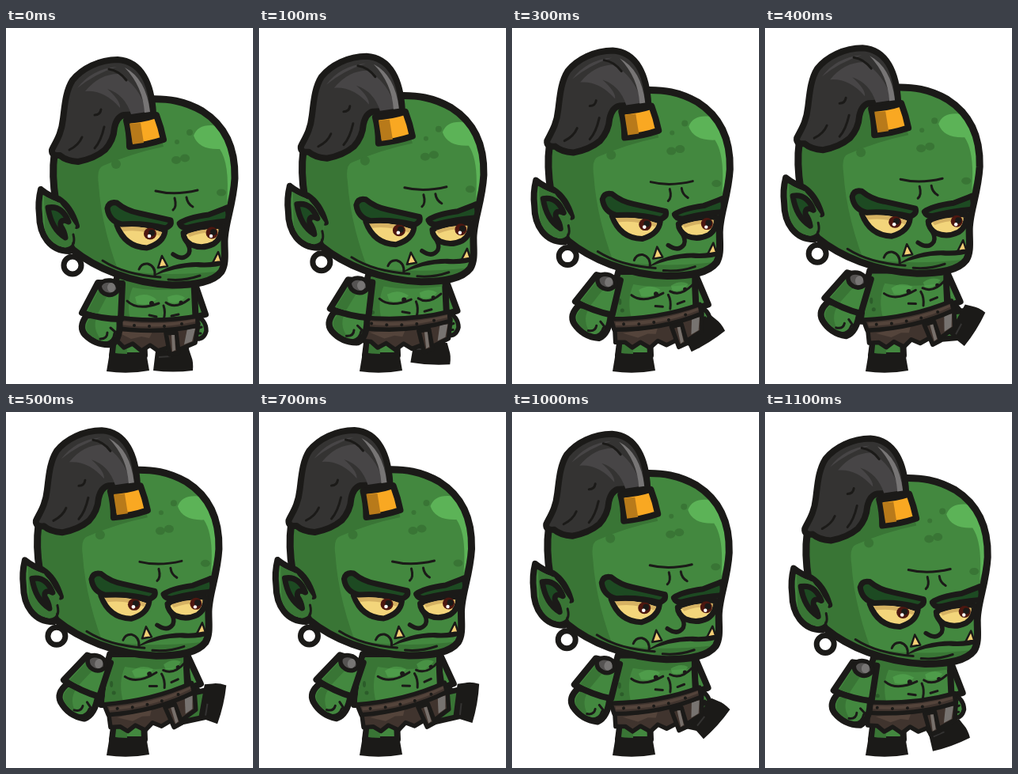
An HTML page for the animation above (1200 ms loop, 312x450 px).

```html
<!DOCTYPE html>
<html lang="en">
<head>
<meta charset="utf-8">
<title>Walking orc</title>
<style>
  html, body { margin: 0; width: 100%; height: 100%; overflow: hidden; background: #fff; }
  svg { display: block; width: 100vw; height: 100vh; }
  .o { stroke: #1b1a18; stroke-width: 8; stroke-linejoin: round; stroke-linecap: round; }
  .m { stroke-width: 5.5; }
  .t { stroke-width: 3; }
  .n { fill: none; }
  .g { fill: #43883f; }
  .d { fill: #397535; }
  .l { fill: #5cb357; }
  .k { fill: #1b1a18; }
  .brow { fill: #1d4a22; stroke-width: 7; }
  .eye { fill: #f3d57b; stroke-width: 7; }
  .lid { fill: #d6b263; }
  .iris { fill: #4d1710; }
  .tusk { fill: #f6cf76; stroke-width: 2.5; }
  .hair { fill: #343332; }
  .shine { fill: #474546; }
  .cloth { fill: #40342e; }
  .cloth2 { fill: #54443b; }
</style>
</head>
<body>
<svg viewBox="0 0 312 450">
  <defs>
    <path id="skull" d="M61 160C57 190 62 245 84 280C112 303 158 323 210 325C240 325 262 321 272 308C278 298 276 285 276 272C275 250 287 225 289 190C290 150 275 122 248 105C225 92 205 89 180 90L90 115Z"/>
    <clipPath id="skullClip"><use href="#skull"/></clipPath>
  </defs>

  <g id="farArm">
    <path class="o g" d="M234 318L239 324L252 362L237 366Z"/>
    <path class="o m g" d="M239 363Q253 369 253 383Q250 394 240 393Z"/>
    <path class="o t n" d="M241 380l6-2M241 386l5 0"/>
  </g>

  <path class="o g" d="M137 390H174L175 414H134Z"/>
  <path class="d" d="M140 390H152L153 412H138Z"/>
  <path class="k" d="M131 410Q153 414 177 410L181 433Q154 438 127 434Z"/>

  <path id="legEdge" class="o" style="stroke-width:40;stroke-linecap:butt"/>
  <path id="legSkin" style="stroke:#397535;stroke-width:26"/>
  <g id="boot">
    <path class="k" d="M-22-12L20-14L23-5Q26 2 25 13Q0 16-25 13Z"/>
    <path fill="#343332" d="M-18-5L-3-6L-3-4L-18-3Z"/>
  </g>

  <g id="torso">
    <path class="o g" d="M141 312H237L240 376H130Q131 350 141 312Z"/>
    <path class="d" d="M144 316H234V328Q190 334 160 328Q151 348 158 373H134Q136 345 144 316Z"/>
    <g fill="#2c5c2a"><ellipse cx="143" cy="350" rx="2" ry="4"/><circle cx="146" cy="361" r="2.5"/></g>
  </g>
  <g id="chest">
    <path class="l" opacity=".45" d="M163 340Q177 333 190 343Q181 353 165 348ZM204 340Q217 334 226 341Q217 351 205 346Z"/>
    <path class="o t n" d="M153 345Q166 358 193 348M202 347Q214 356 231 343M199 351Q202 359 199 369M181 363l9 2M209 364l9-2"/>
    <g class="k"><circle cx="184" cy="348" r="3"/><circle cx="221" cy="347" r="2.5"/></g>
  </g>

  <g id="belt">
    <path class="o m cloth" d="M131 376L129 394L141 396L149 404L160 399L171 408L182 401L192 408L205 404L220 406L239 398L243 374Z"/>
    <path class="cloth2" d="M140 384H185L181 392L171 390L158 393Z"/>
    <path fill="#777370" d="M229 380H239L235 396L225 400Z"/>
    <path class="o m cloth" d="M128 364Q188 374 242 364V376Q190 388 130 378Z"/>
    <path class="cloth2" d="M133 369Q188 378 239 368V371Q188 383 133 373Z"/>
    <g class="k"><circle cx="143" cy="373" r="2"/><circle cx="162" cy="376" r="2"/><circle cx="181" cy="377" r="2"/><circle cx="200" cy="377" r="2"/><circle cx="222" cy="374" r="2"/></g>
    <path class="o m cloth" d="M202 386L215 385L218 410L207 413Z"/>
    <path fill="#77706b" d="M209 388H213L214 407L210 409Z"/>
  </g>

  <g id="nearArm">
    <path class="o g" d="M102 363Q91 378 100 388Q114 402 134 400Q146 392 143 366Z"/>
    <path class="d" d="M106 367Q97 378 105 387Q113 394 122 396Q109 382 114 367Z"/>
    <path class="o t n" d="M119 393Q128 393 128 385M127 398Q136 396 137 386M132 379l7 6"/>
    <path class="o g" d="M116 322L96 360Q121 368 145 368L147 323Z"/>
    <path class="d" d="M118 329L103 358L116 361L128 338Z"/>
    <path class="o m" fill="#555352" d="M118 326Q121 318 132 319Q142 321 142 331Q136 339 128 337Q119 335 118 326Z"/>
    <ellipse cx="133" cy="328" rx="5" ry="6" fill="#777574"/>
  </g>

  <g id="head">
    <circle class="o n" cx="84" cy="300" r="11" style="stroke-width:7"/>
    <use href="#skull" class="g"/>
    <g clip-path="url(#skullClip)">
      <path class="d" d="M50 80H180L199 150Q160 158 123 174Q114 177 117 198Q121 258 149 325H50Z"/>
      <path class="d" d="M100 294Q165 318 265 308V330H100Z"/>
      <path class="l" d="M237 136Q242 122 261 123Q280 130 286 153Q290 187 279 220Q283 172 270 153Q243 154 237 136Z"/>
      <g class="d">
        <circle cx="139" cy="172" r="6"/>
        <ellipse cx="215" cy="167" rx="6" ry="5"/><ellipse cx="226" cy="164.500" rx="6" ry="5"/>
        <circle cx="232" cy="132" r="4"/><circle cx="216" cy="144" r="3"/>
        <ellipse cx="272" cy="208" rx="6" ry="4.500"/>
      </g>
    </g>
    <use href="#skull" class="o n" style="stroke-width:9"/>

    <path class="o g" d="M80 282C56 282 42 262 42 236Q40 220 44 204Q54 212 66 216Q82 226 89 250"/>
    <path class="d" d="M48 212Q60 219 68 221L88 250L82 278Q57 278 49 255Z"/>
    <path class="o m brow" d="M53 227Q71 224 79 245Q68 240 69 250Q74 257 75 265Q57 254 53 227Z"/>
    <path class="o t n" d="M85 261Q89 277 76 279"/>

    <path class="o hair" d="M186 108C184 72 172 42 141 40C118 40 96 51 84 66C75 80 74 100 72 115C70 135 62 145 58 154Q57 162 68 161Q76 168 91 169Q112 165 125 154Q136 142 137 126Q140 112 149 110Z"/>
    <path class="shine" d="M100 80Q118 58 142 58Q168 72 178 106L158 109Q150 84 128 77Q145 92 144 101Q124 78 100 80Z"/>
    <path fill="#777575" d="M150 50Q177 64 182 106L175 107Q173 74 150 50Z"/>
    <path class="shine" d="M90 76Q108 52 140 49Q112 58 90 76Z"/>
    <path class="o t n" d="M112 110Q119 110 120 103M130 52Q143 54 152 66M124 125Q120 143 112 152M80 154Q92 148 96 138"/>

    <path class="o" fill="#f9a822" d="M152 117Q172 116 190 110Q196 126 199 141Q178 148 156 150Q156 132 152 117Z"/>
    <path fill="#b87a1a" d="M156 121L170 120L174 145L160 147Z"/>

    <path class="o eye" d="M140 249Q170 244 201 256Q199 272 178 278Q150 277 140 249Z"/>
    <path class="lid" d="M144 251Q170 249 197 258L195 263Q170 254 148 257Z"/>
    <ellipse class="iris" cx="182" cy="260" rx="8" ry="7.500"/>
    <circle class="k" cx="184" cy="259" r="4"/>
    <circle cx="181" cy="263" r="2.300" fill="#fff"/>
    <path class="o eye" d="M224 259Q245 249 272 251Q273 266 262 273Q248 280 234 274Q224 268 224 259Z"/>
    <path class="lid" d="M229 260Q248 253 268 254V259Q250 257 232 264Z"/>
    <ellipse class="iris" cx="260" cy="259" rx="7.500" ry="7.500"/>
    <circle class="k" cx="262" cy="258" r="4"/>
    <circle cx="259" cy="263" r="2.200" fill="#fff"/>

    <path class="o brow" d="M128 228Q130 219 140 221Q152 231 168 234Q190 239 208 243Q210 250 201 253Q175 246 146 248Q130 244 128 228Z"/>
    <path class="o brow" d="M219 247Q228 240 256 236Q272 230 279 227Q283 236 279 244Q255 246 231 252Q222 254 219 247Z"/>

    <path class="o t n" d="M189 206Q213 212 242 205M211 230Q216 226 213 215M228 214Q229 222 236 226"/>
    <path class="o m n" d="M227 269Q234 278 231 285Q224 295 211 286"/>
    <path class="k" d="M185 314Q208 296 243 296Q262 298 279 290L279 298Q262 304 240 302Q215 302 185 314Z"/>
    <path class="o t n" d="M168 305Q171 297 179 298Q189 301 188 313M122 294Q150 312 195 315M205 318Q225 320 245 313"/>
    <path class="o tusk" d="M192 303L197 288L204 301ZM261 297L268 283L272 295Z"/>
  </g>
</svg>
<script>
const el = id => document.getElementById(id);
const STEP = 100;
// How far the body has leaned back at each step, 0 to 1.
const lean = [0, .25, .45, .67, .87, .98, 1, 1, 1, .96, .72, .38];
// Lifted boot at each step: x, y, turn in degrees.
const boot = [
  [211, 420, 0], [217, 411, 3], [229, 399, -12], [241, 385, -32],
  [254, 374, -58], [260, 367, -77], [261, 366, -80], [261, 366, -80],
  [261, 366, -79], [260, 368, -75], [249, 386, -48], [231, 408, -20]
];

function move(id, x, y, turn = 0, cx = 0, cy = 0) {
  el(id).setAttribute("transform", `translate(${x} ${y}) rotate(${turn} ${cx} ${cy})`);
}

function draw(now) {
  const i = Math.floor(now / STEP) % lean.length;
  const p = lean[i], [x, y, turn] = boot[i];
  move("head", -20.5 * p, -17 * p);
  move("torso", -10 * p, -6 * p);
  move("chest", 2 * p, -19 * p, -12 * p, 190, 372);
  move("belt", -4 * p, -9 * p, -14 * p, 188, 372);
  move("nearArm", -16 * p, -11 * p, 16 * p, 130, 328);
  move("farArm", -10 * p, -17 * p, -6 * p, 238, 325);
  move("boot", x, y, turn);
  const leg = `M${211 + 6 * p} ${386 - 10 * p}L${x} ${y}`;
  el("legEdge").setAttribute("d", leg);
  el("legSkin").setAttribute("d", leg);
  requestAnimationFrame(draw);
}
draw(performance.now());
</script>
</body>
</html>
```
